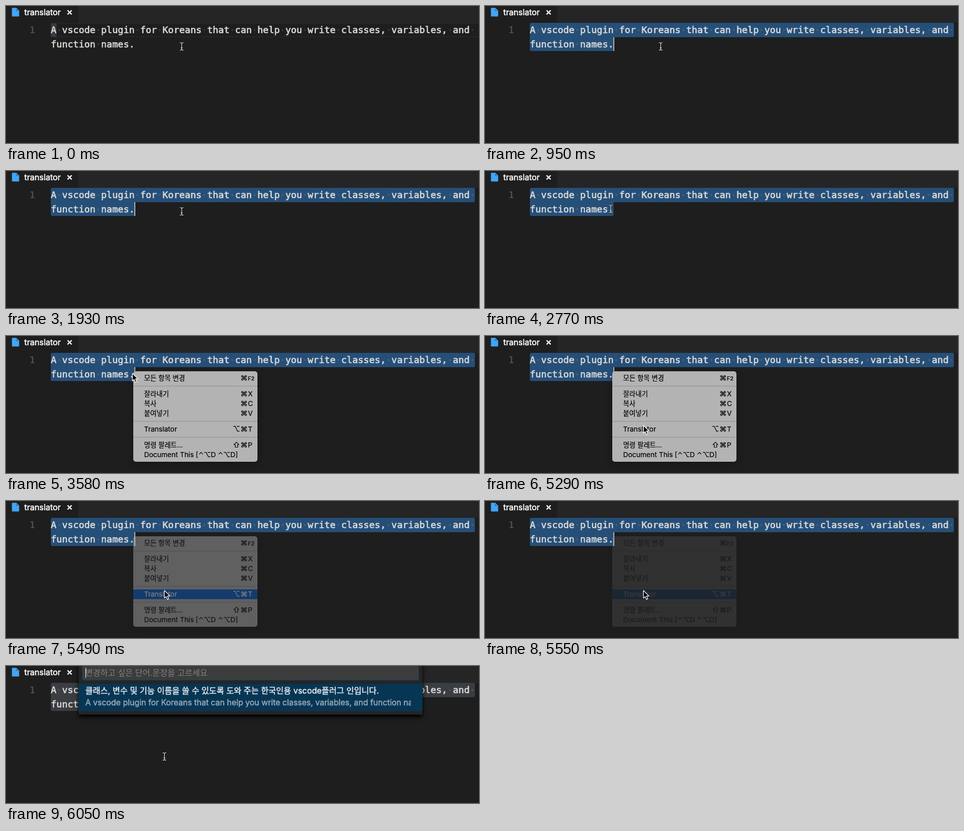
These frames come from a looping animation (918x268 px, 8000 ms). An HTML page with a canvas:

```html
<!DOCTYPE html>
<html lang="ko">
<head>
<meta charset="utf-8">
<title>Translator</title>
<style>
  html, body { margin: 0; width: 100%; height: 100%; overflow: hidden; background: #1e1e1e; }
  canvas { display: block; }
</style>
</head>
<body>
<canvas id="stage" width="918" height="268"></canvas>
<script>
const stage = document.getElementById('stage').getContext('2d');
const layer = new OffscreenCanvas(918, 268).getContext('2d');
let ctx = stage;

const LOOP = 8000;
const MONO = '18px "DejaVu Sans Mono", monospace';
const CELL = 10.837;
const LEFT = 87;
const LINES = [
  'A vscode plugin for Koreans that can help you write classes, variables, and ',
  'function names.'
];
const MENU = { x: 247, y: 69, w: 241, h: 177 };
const ITEMS = [
  { y: 82, label: '모든 항목 변경', keys: '⌘', fn: 'F2' },
  { y: 113, label: '잘라내기', keys: '⌘X' },
  { y: 132, label: '복사', keys: '⌘C' },
  { y: 151, label: '붙여넣기', keys: '⌘V' },
  { y: 182, label: 'Translator', keys: '⌥⌘T' },
  { y: 213, label: '명령 팔레트...', keys: '⇧⌘P' },
  { y: 232, label: 'Document This [⌃⌥D ⌃⌥D]', keys: '' }
];
const TRANSLATOR = 4;

const ui = (size, weight = 400) =>
  `${weight} ${size}px Inter, "Noto Sans CJK KR", "DejaVu Sans", sans-serif`;
const clamp = v => Math.min(1, Math.max(0, v));
const ease = p => p * p * (3 - 2 * p);
const between = (t, a, b) => t >= a && t < b;

function rect(x, y, w, h, color) {
  ctx.fillStyle = color;
  ctx.fillRect(x, y, w, h);
}

function round(x, y, w, h, r, color) {
  ctx.fillStyle = color;
  ctx.beginPath();
  ctx.roundRect(x, y, w, h, r);
  ctx.fill();
}

// A thin outline thickens the glyphs without changing their advance.
function text(str, x, y, font, color, bold = .2) {
  ctx.font = font;
  ctx.fillStyle = ctx.strokeStyle = color;
  ctx.lineWidth = bold;
  ctx.lineJoin = 'round';
  ctx.fillText(str, x, y);
  if (bold) ctx.strokeText(str, x, y);
}

function poly(points, color) {
  ctx.fillStyle = color;
  ctx.beginPath();
  points.forEach(([x, y]) => ctx.lineTo(x, y));
  ctx.closePath();
  ctx.fill();
}

function drawTab() {
  rect(140, 0, 778, 33, '#252526');
  poly([[12, 4], [20, 4], [25, 9], [25, 20], [12, 20]], '#42a5f5');
  ctx.strokeStyle = '#42a5f5';
  ctx.lineWidth = 1;
  ctx.lineJoin = 'round';
  ctx.stroke();
  poly([[19.5, 5], [24, 9.5], [19.5, 9.5]], '#2b6fa5');
  text('translator', 35.5, 18, ui(15.8), '#fff', .5);
  ctx.strokeStyle = '#fff';
  ctx.lineWidth = 2.4;
  ctx.beginPath();
  ctx.moveTo(119.5, 8.5); ctx.lineTo(127.5, 16.5);
  ctx.moveTo(127.5, 8.5); ctx.lineTo(119.5, 16.5);
  ctx.stroke();
}

function drawSelection(t) {
  const color = t < 6050 ? '#264f78' : '#3a3d41';
  const both = t >= 950;
  round(LEFT, 33, 823, 28, [3, 3, 3, both ? 0 : 3], color);
  if (!both) return;
  const end = LEFT + 15 * CELL;
  round(LEFT, 61, end - LEFT, 27, [0, 0, 3, 3], color);
  ctx.beginPath();
  ctx.moveTo(end, 61);
  ctx.lineTo(end + 3, 61);
  ctx.quadraticCurveTo(end, 61, end, 64);
  ctx.fill();
}

function drawEditor(t) {
  text('1', 45.5, 53, MONO, '#5a5a5a');
  if (t < 660) {
    rect(LEFT, 33, 831, 1.5, '#282828');
    rect(LEFT, 59.5, 831, 1.5, '#282828');
    rect(LEFT, 34, 11, 26, '#363c43');
  } else {
    drawSelection(t);
  }
  LINES.forEach((line, row) => {
    const y = 53 + row * 28;
    text(line, LEFT, y, MONO, '#d8d8d6', .7);
    ctx.fillStyle = 'rgba(227,228,226,.2)';
    [...line].forEach((ch, i) => {
      if (ch !== ' ') return;
      ctx.beginPath();
      ctx.arc(LEFT + (i + .5) * CELL, y - 6, 1.4, 0, 7);
      ctx.fill();
    });
  });
  if (between(t, 420, 660)) rect(87, 33, 2, 28, '#aeafad');
  else if (between(t, 660, 950)) rect(87, 61, 2, 27, '#aeafad');
  else if (between(t, 950, 1430) || between(t, 1930, 2430) || between(t, 2920, 6050))
    rect(249, 61, 2, 27, '#aeafad');
}

function pointer(t) {
  if (t < 1960) return [341, 79];
  if (t < 2650) {
    const p = ease(clamp((t - 2110) / 360));
    return [340 - 110 * p, 79 - p];
  }
  if (t < 3070) {
    const p = clamp((t - 2620) / 150);
    return [230 + 14 * p, 78 - 4 * p];
  }
  if (t < 5730) {
    const p = ease(clamp((t - 3560) / 500));
    return [245 + 62.5 * p, 72.5 + 102.5 * p];
  }
  return [307.5, 177];
}

function activeItem(t, [x, y]) {
  if (t >= 5340) return TRANSLATOR;
  if (t >= 5290 || x < MENU.x) return -1;
  return ITEMS.findIndex(item => y >= item.y - 9 && y < item.y + 10);
}

function menuAlpha(t) {
  if (!between(t, 3070, 5610)) return 0;
  if (t < 5400) return 1;
  const step = Math.min(5, Math.floor((t - 5400) / 30));
  return (174 - step * 30) / 190;
}

function drawKeys(item, color) {
  const letter = item.keys.slice(-1);
  const symbols = item.fn ? item.keys : item.keys.slice(0, -1);
  [...symbols].reverse().forEach((s, i) => text(s, 455 - i * 15, item.y + 5, ui(14), color));
  if (item.fn) text(item.fn, 469.5, item.y + 5, ui(10.5, 500), color);
  else text(letter, 469.5, item.y + 5, ui(13.5), color);
}

function drawMenu(active) {
  ctx.save();
  ctx.shadowColor = 'rgba(0,0,0,.3)';
  ctx.shadowBlur = 14;
  ctx.shadowOffsetY = 4;
  round(MENU.x, MENU.y, MENU.w, MENU.h, 5, '#b3b3b3');
  ctx.restore();
  for (const y of [97, 166, 197]) rect(MENU.x, y, MENU.w, 2, '#a0a0a0');
  ITEMS.forEach((item, i) => {
    const color = i === active ? '#fff' : '#000';
    if (i === active) rect(MENU.x, item.y - 9, MENU.w, 19, '#0861d2');
    const korean = item.label > '가';
    text(item.label, 268, item.y + 5, ui(korean ? 13.1 : 13.5), color);
    if (item.keys) drawKeys(item, color);
  });
}

// The menu is painted on its own layer so that it fades as one piece.
function showMenu(alpha, active) {
  ctx = layer;
  ctx.clearRect(0, 0, 918, 268);
  drawMenu(active);
  ctx = stage;
  ctx.globalAlpha = alpha;
  ctx.drawImage(layer.canvas, 0, 0);
  ctx.globalAlpha = 1;
}

function drawPicker() {
  ctx.save();
  ctx.shadowColor = '#000';
  ctx.shadowBlur = 8;
  ctx.shadowOffsetY = 5;
  rect(141, -10, 667, 105, '#252526');
  ctx.restore();
  rect(148, -4, 653, 32, '#0d4a73');
  rect(149, -4, 651, 31, '#3c3c3c');
  text('변경하고 싶은 단어.문장을 고르세요', 154, 19, ui(15.88), '#808080', 0);
  rect(154, 4, 1.5, 19, '#ccc');
  rect(141, 35, 667, 53, '#073655');
  ctx.save();
  ctx.beginPath();
  ctx.rect(148, 35, 638, 53);
  ctx.clip();
  text('클래스, 변수 및 기능 이름을 쓸 수 있도록 도와 주는 한국인용 vscode플러그 인입니다.',
    154, 54, ui(15.86), '#e8ecef', .45);
  text(LINES.join(''), 154, 77, ui(15.5), '#9aabb8', .45);
  ctx.restore();
}

function drawBeam(x, y) {
  ctx.beginPath();
  for (const s of [-1, 1]) {
    ctx.moveTo(x - 3.5, y + s * 7.5);
    ctx.quadraticCurveTo(x, y + s * 7.5, x, y + s * 5);
    ctx.quadraticCurveTo(x, y + s * 7.5, x + 3.5, y + s * 7.5);
  }
  ctx.moveTo(x, y - 6); ctx.lineTo(x, y + 6);
  ctx.moveTo(x - 2, y + 3); ctx.lineTo(x + 2, y + 3);
  ctx.strokeStyle = '#111';
  ctx.lineWidth = 2.6;
  ctx.stroke();
  ctx.strokeStyle = '#e6e6e6';
  ctx.lineWidth = 1.2;
  ctx.stroke();
}

function drawArrow(x, y) {
  const shape = [[0, 0], [0, 15], [3.4, 11.9], [5.8, 17.6], [8.4, 16.5], [6, 10.9], [10.6, 10.9]];
  poly(shape.map(([dx, dy]) => [x + dx, y + dy]), '#000');
  ctx.strokeStyle = '#fff';
  ctx.lineWidth = 1.2;
  ctx.stroke();
}

function draw(t) {
  const pos = pointer(t);
  const alpha = menuAlpha(t);
  rect(0, 0, 918, 268, '#1e1e1e');
  drawTab();
  drawEditor(t);
  if (alpha) showMenu(alpha, activeItem(t, pos));
  if (t >= 6050) drawPicker();
  (between(t, 3070, 5730) ? drawArrow : drawBeam)(...pos);
}

const start = performance.now();
function tick() {
  draw((performance.now() - start) % LOOP);
  requestAnimationFrame(tick);
}
tick();
</script>
</body>
</html>
```
